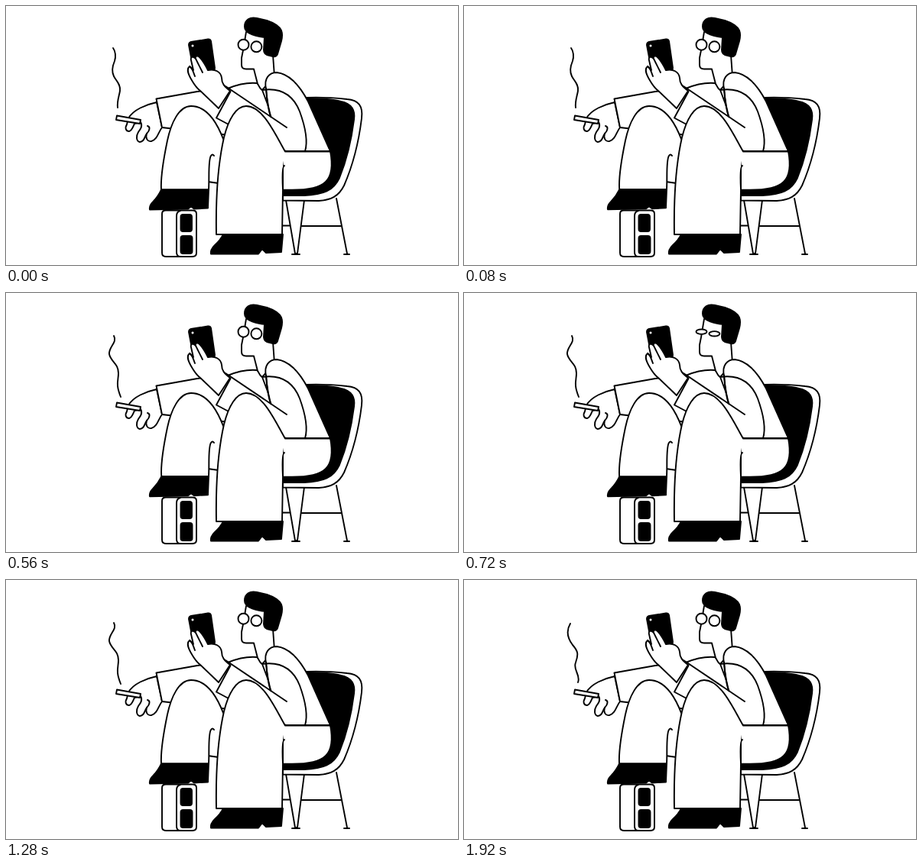
Recreate the animation shown at these times as an HTML page. Size 591 px wide and 339 px high, loop 1.96 s.

```html
<!DOCTYPE html>
<html>
<head>
<meta charset="utf-8">
<style>
html, body { margin: 0; width: 100%; height: 100%; overflow: hidden; background: #fff; }
svg { display: block; width: 591px; height: 339px; }
.line { fill: none; }
.ink { fill: #000; }
</style>
</head>
<body>
<svg viewBox="0 0 591 339" fill="#fff" stroke="#000" stroke-width="1.9" stroke-linecap="round" stroke-linejoin="round">
  <!-- chair -->
  <path class="line" d="M366 254L378 324L381 324L390 254M374 325H384M432 252L446 324M442 325H449M362 287.5H371M386 288H439"/>
  <path d="M392 120C410 119 427 120 446 122C461 123 467 131 465 147C461 180 452 212 442 235C435 249 425 254 409 255L362 254.500V190Z"/>
  <path class="ink" d="M393 121C410 121 427 122 438 125C452 128 457 136 455 149C451 181 445 203 436 225C428 242 415 247 390 248H362V190Z"/>
  <path d="M362 240.500C392 242 410 238 418 230C427 221 427 206 424 190H362Z"/>

  <!-- resting arm and cigarette -->
  <path d="M197 126C183 129 166 136 160 147L158 155C155 160 157 164 161 164C165 163 166 158 168 154L176 152C179 157 176 161 173 165C170 170 170 177 175 178C181 178 181 171 184 167C182 173 185 178 190 177C198 175 199 165 204 159Z"/>
  <path class="line" d="M184 167C188 163 189 158 185 157"/>
  <path d="M145 143.500L176 149L175 154L144 149Z"/>
  <path d="M196.500 121.500L250 112L290 108C302 103 316 100 328 101C332 103 332 107 335 110L350 150L300 170L204 159Z"/>

  <!-- neck, head, hair -->
  <path d="M314 34L310 58L308 68V77C308 81 310 82.500 314 82.500H324L329 102C331 104 331 108 335 110L351 92L349 64L340 32Z"/>
  <path class="ink" d="M312 27C312 18 319 14 328 16L341 19C350 22 357 26 360 32C362 37 361 42 360 46L355 63Q353 67 349 66L341 64Q337 62 337 57L338 41C330 40 312 37 312 27Z"/>
  <ellipse id="lensA" cx="310.500" cy="50.700" rx="7" ry="7"/>
  <ellipse id="lensB" cx="327.400" cy="53.300" rx="7" ry="7"/>

  <!-- torso -->
  <path d="M340 108C337 95 344 87 354 87C372 89 385 106 395 125L424 190H365L348 150C343 136 341 121 340 108Z"/>
  <path class="line" d="M335 110C356 107 374 113 384 138C392 160 395 177 391 190"/>
  <path d="M290 107L367 159L365 190L340 180L292 155L275 147Z" stroke="none"/>
  <path class="line" d="M340 108C341 122 343 136 346 145"/>

  <!-- phone and raised hand -->
  <path class="ink" d="M242 47L264 43.500Q267 43 268 46L273 81Q273 85 269 85L249 86Q246 86 245 83L239 51Q239 48 242 47Z"/>
  <circle cx="244" cy="52" r="1.5" stroke="none"/>
  <path d="M240 79C235 83 239 91 244 99C247 104 250 108 254 111L278 134L293 111C285 105 282 101 282 94C281 86 273 82 264 84C261 78 257 71 253 67C250 64 247 66 248 69C244 65 241 67 242 71L245 84Z"/>
  <path class="line" d="M240 79Q243 80 247 92M248 69L257 87M287 105L367 159M293.500 112L275 146.500L291 155"/>

  <!-- bouncing leg -->
  <path class="line" d="M264 230L278 232"/>
  <path id="shin"/>
  <path id="shoe" class="ink"/>

  <!-- planted leg -->
  <path d="M275 299C274 245 278 203 285 172C291 148 301 131 314 131C336 131 352 168 365 190L362 209V240L361 299Z" stroke="none"/>
  <path class="line" d="M365 190.500C352 168 336 131 314 131C301 131 291 148 285 172C278 203 274 245 275 299H361L362 240C361 222 361 210 364 209M365 190.500H424"/>
  <path class="ink" d="M284 299H362L360 322L340 323L335 318L330 324.500H268Q267 319 273 313Q280 307 284 299Z"/>

  <!-- block -->
  <path d="M209 267.500H244Q249 267.500 249 272V323Q249 328 244 328H209Q204 328 204 323V272Q204 267.500 209 267.500Z"/>
  <path class="line" d="M228 268Q223 269 223 275V322Q223 327 227 328"/>
  <rect class="ink" x="228.500" y="273" width="14.500" height="22" rx="3"/>
  <rect class="ink" x="228.500" y="301" width="15" height="23" rx="3"/>

  <path id="smoke" class="line"/>
  <rect id="flash" class="ink" width="591" height="339" stroke="none"/>
</svg>
<script>
const LOOP = 1960, STEP = 40;
const $ = id => document.getElementById(id);
const set = (id, name, value) => $(id).setAttribute(name, value);

const plumes = {
  a: "M140 55C143 59 144 66 142 72C139 79 138 86 141 92C144 98 150 102 149 111C148 118 145 124 146 133",
  b: "M139 57C133 67 136 77 142 85C149 93 150 97 146 108C142 118 153 124 149 134",
  c: "M141 56C146 65 134 70 135 80C137 90 147 92 147 105C147 115 143 119 150 136"
};
const plumeOrder = "abcacab";

function draw(t) {
  set("flash", "visibility", t === STEP ? "visible" : "hidden");
  set("smoke", "d", plumes[plumeOrder[Math.floor(t / 280)]]);

  // three leg bounces per loop
  const lift = 1 - Math.cos(t / LOOP * 6 * Math.PI);
  const x = 203 + lift * 0.8, y = 240.5 - lift * 0.8;
  set("shin", "d", `M284 174C274 148 260 131 242 131C226 131 216 153 211 176C205 205 202 225 ${x} ${y}H265C266 225 264 202 268 196Q270 193 272 196`);
  set("shoe", "d", `M${x} ${y}H265L264 ${y + 24}L246 ${y + 25}L242 ${y + 22}L238 ${y + 25}L188 ${y + 26}Q187 ${y + 21} 192 ${y + 16}Q199 ${y + 9} ${x} ${y}Z`);

  // blink
  const near = Math.max(0, 1 - Math.abs(t - 780) / 140);
  const ry = 7 * (1 - 0.9 * Math.sin(near * Math.PI / 2) ** 2);
  set("lensA", "ry", ry);
  set("lensB", "ry", ry);
}

function tick() {
  draw(Math.floor(performance.now() % LOOP / STEP) * STEP);
  requestAnimationFrame(tick);
}
tick();
</script>
</body>
</html>
```
